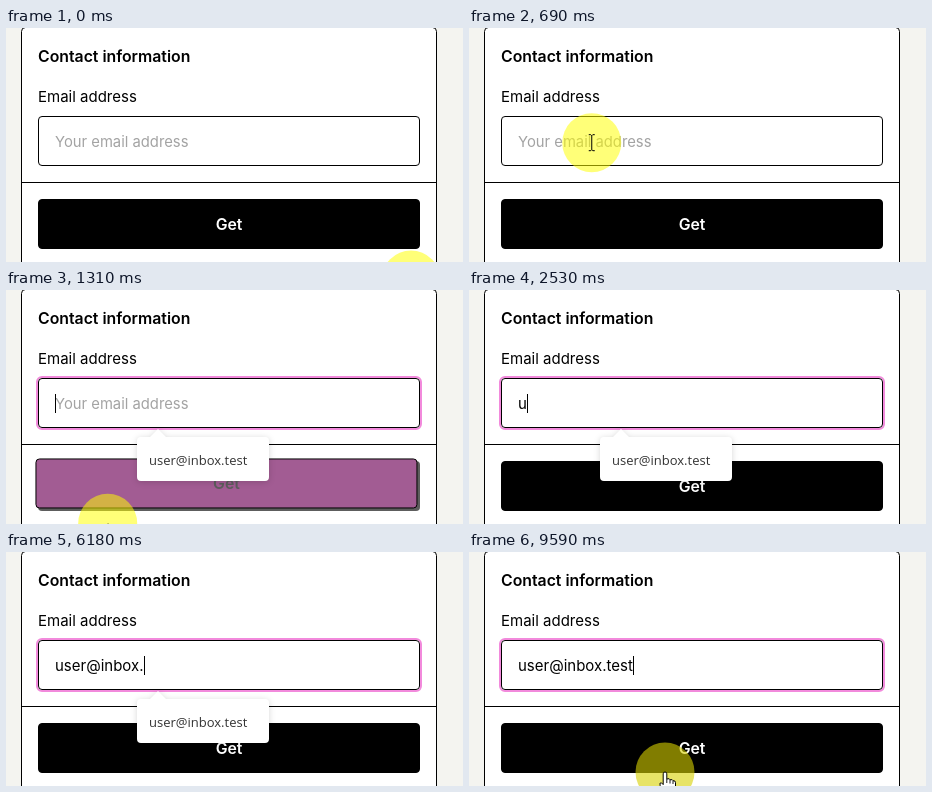
Animation, 457 px wide and 234 px high, one loop 9.66 s. Source, as an HTML page:

```html
<!DOCTYPE html>
<html lang="en">
<head>
<meta charset="utf-8">
<title>Contact form</title>
<style>
  html, body { margin: 0; width: 100%; height: 100%; overflow: hidden; background: #f4f4f0; }
  svg { display: block; width: 457px; height: 234px; }
  text { font: 15px Inter, sans-serif; white-space: pre; }
  .bold { font-weight: 600; font-size: 15.8px; }
  #hint { font-size: 14.8px; fill: #a3a3a3; }
  #popup { filter: drop-shadow(0 1px 3px rgba(0, 0, 0, .16)); }
  #popup text { font: 13px "Open Sans", sans-serif; fill: #333; }
</style>
</head>
<body>
<svg viewBox="0 0 457 234">
  <rect width="457" height="234" fill="#f4f4f0"/>
  <rect x="15.5" y="-.5" width="415" height="300" rx="4" fill="#fff" stroke="#000"/>
  <path d="M16 154.5H430" stroke="#000"/>
  <text class="bold" x="32" y="34">Contact information</text>
  <text x="32" y="74">Email address</text>

  <rect id="ring" x="31" y="87" width="384" height="52" rx="5" fill="none" stroke="#f28adc" stroke-width="2"/>
  <rect x="32.5" y="88.5" width="381" height="49" rx="3.5" fill="#fff" stroke="#000"/>
  <text id="hint" x="49" y="119">Your email address</text>
  <text id="value" x="49" y="119"></text>
  <rect id="caret" y="104" width="1" height="19"/>

  <rect id="shadow" x="32" y="171" width="382" height="50" rx="4"/>
  <g id="button">
    <rect id="face" x="32.5" y="171.5" width="381" height="49" rx="3.5" stroke="#000"/>
    <text id="label" class="bold" x="223" y="202" text-anchor="middle">Get</text>
  </g>

  <g id="popup">
    <path d="M135 147H144L152 139L160 147H259a4 4 0 0 1 4 4V187a4 4 0 0 1-4 4H135a4 4 0 0 1-4-4V151a4 4 0 0 1 4-4Z" fill="#fff"/>
    <text id="option" x="143" y="174.5"></text>
  </g>

  <g id="pointer">
    <circle id="halo" r="29.5"/>
    <path id="arrow" d="M.5 .5V16.5L4.2 13L6.8 18.8L9.6 17.6L7 11.9H12Z" fill="#fff" stroke="#000"/>
    <path id="beam" d="M-3-8H-1L0-7L1-8H3M0-7V7M-3 8H-1L0 7L1 8H3" fill="none" stroke="#000"/>
    <path id="hand" d="M-1.8 1.8a1.8 1.8 0 0 1 3.6 0V7q3-1 3.2 .8q2.8-.7 3 .9q2.5-.4 2.5 2V14.5q0 2.2-1.6 4.5V21H-.8V19.3L-4.8 13.6Q-6 10.6-3.6 10.8L-1.8 12.6Z" fill="#fff" stroke="#000"/>
    <path id="knuckles" d="M1.8 7V11M5 8V11.5M8 9V12" stroke="#000" stroke-width=".9"/>
  </g>
</svg>
<script>
  const LOOP = 9660, FOCUS = 870, BLINK = 530;
  const ADDRESS = 'user@inbox.test';
  const KEYS = [2530, 3060, 3190, 3790, 4720, 5050, 5160, 5270, 5380, 5710, 6180, 6660, 6790, 6930, 7000];
  const TYPED = KEYS[KEYS.length - 1];
  // Pointer visits: [time, x, y]
  const ENTER = [[0, 405, 252], [199, 405, 252], [200, 375, 240], [480, 164, 154.5],
    [700, 121, 113], [890, 118, 112], [1170, 107, 181], [1410, 98, 270]];
  const RETURN = [[9520, 182, 244], [9590, 196, 220]];
  const HOVERS = [[250, 448], [1180, 1290]];

  const $ = id => document.getElementById(id);
  const set = (id, attrs) => { for (const k in attrs) $(id).setAttribute(k, attrs[k]); };
  const show = (id, on) => set(id, { visibility: on ? 'inherit' : 'hidden' });
  const clamp = v => Math.min(1, Math.max(0, v));
  const ramp = (t, start, length) => clamp((t - start) / length);

  function along(path, t) {
    const i = path.findIndex(p => p[0] > t);
    if (i < 0) return path[path.length - 1].slice(1);
    const a = path[i - 1], b = path[i], k = (t - a[0]) / (b[0] - a[0]);
    return [a[1] + (b[1] - a[1]) * k, a[2] + (b[2] - a[2]) * k];
  }

  function hoverAt(t) {
    return Math.max(...HOVERS.map(([start, end]) =>
      clamp(ramp(Math.min(t, end), start, 140) - ramp(t, end, 140))));
  }

  function drawField(t) {
    const count = KEYS.filter(k => k <= t).length;
    const last = count ? KEYS[count - 1] : FOCUS;
    const focused = t >= FOCUS;
    $('value').textContent = ADDRESS.slice(0, count);
    show('hint', !count);
    show('ring', focused);
    show('caret', focused && Math.floor((Math.min(t, 9600) - last) / BLINK) % 2 === 0);
    set('caret', { x: 49 + (count ? Math.round($('value').getComputedTextLength()) : 0) });
    set('popup', { opacity: ramp(t, FOCUS, 130) - ramp(t, TYPED, 200) });
  }

  function drawButton(t) {
    const k = hoverAt(t), grey = 255 * (1 - k);
    set('button', { transform: `translate(${-4 * k} ${-4 * k})` });
    set('shadow', { opacity: k });
    set('face', { fill: `rgb(${255 * k},${144 * k},${232 * k})` });
    set('label', { fill: `rgb(${grey},${grey},${grey})` });
  }

  function drawPointer(t) {
    const [x, y] = along(t < RETURN[0][0] ? ENTER : RETURN, t);
    const hand = y > 171 && y < 221 && x < 414;
    const beam = y > 88 && y < 138;
    show('pointer', t < 1410 || t >= RETURN[0][0]);
    show('hand', hand);
    show('knuckles', hand);
    show('beam', beam);
    show('arrow', !hand && !beam);
    set('pointer', { transform: `translate(${x} ${y})` });
    set('halo', hand ? { fill: '#d8d000', opacity: .6 } : { fill: '#ff0', opacity: .53 });
  }

  function draw(t) {
    drawField(t);
    drawButton(t);
    drawPointer(t);
  }

  $('option').textContent = ADDRESS;
  const began = performance.now();
  function tick() {
    draw((performance.now() - began) % LOOP);
    requestAnimationFrame(tick);
  }
  tick();
</script>
</body>
</html>
```
